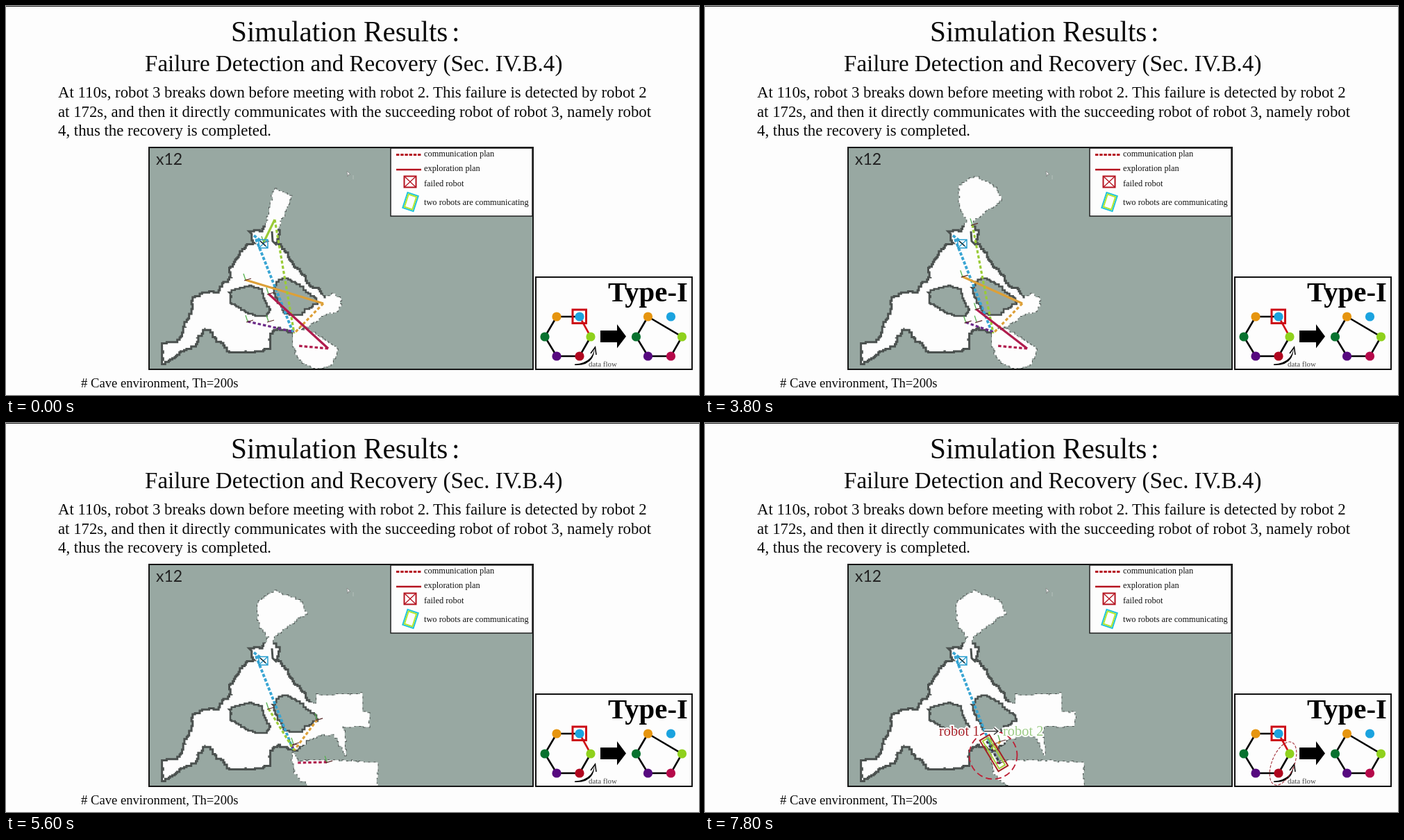
Write an HTML page that moves like this. It is 998 by 561 pixels and loops after 8 s.

```html
<!DOCTYPE html>
<html lang="en">
<head>
<meta charset="utf-8">
<title>Failure Detection and Recovery</title>
<style>
  html, body { margin: 0; width: 100%; height: 100%; overflow: hidden; background: #fdfdfd; }
  svg { display: block; font-family: "Liberation Serif", "Times New Roman", serif; }
  .note { font-size: 20.4px; paint-order: stroke; stroke: #fff; stroke-width: 4px; stroke-linejoin: round; }
  .line { fill: none; }
</style>
</head>
<body>
<svg width="998" height="561" viewBox="0 0 998 561">
  <clipPath id="panel"><rect x="207" y="205" width="551" height="318.5"/></clipPath>
  <rect width="998" height="1" fill="#222"/>

  <g fill="#0a0a0a">
    <g font-size="41.2"><text x="324" y="51">Simulation Results</text><text x="642" y="51">:</text></g>
    <text x="200" y="94" font-size="33.05">Failure Detection and Recovery (Sec. IV.B.4)</text>
    <g font-size="22.8">
      <text x="75" y="132">At 110s, robot 3 breaks down before meeting with robot 2. This failure is detected by robot 2</text>
      <text x="75" y="159.5">at 172s, and then it directly communicates with the succeeding robot of robot 3, namely robot</text>
      <text x="75" y="186.5">4, thus the recovery is completed.</text>
    </g>
    <text x="108" y="550" font-size="18.65"># Cave environment, Th=200s</text>
  </g>

  <rect x="206" y="204" width="553" height="320" fill="#98a8a2"/>
  <g id="map" clip-path="url(#panel)"></g>
  <path d="M491 238l5 5-3 0-1 3z" fill="#eee" stroke="#777" stroke-width=".6"/>
  <path d="M500 244v6" stroke="#b4bfba"/>
  <text x="216" y="229" font-size="23" fill="#222" font-family="Lato, sans-serif">x12</text>
  <rect x="206" y="204" width="553" height="320" fill="none" stroke="#151515" stroke-width="2"/>

  <g font-size="12.36" fill="#111">
    <rect x="554" y="205" width="204" height="98" fill="#fdfdfd" stroke="#222" stroke-width="1.5"/>
    <text x="602" y="217">communication plan</text>
    <text x="602" y="237.5">exploration plan</text>
    <text x="602" y="260">failed robot</text>
    <text x="602" y="287">two robots are communicating</text>
  </g>
  <g class="line" stroke="#b5121f" stroke-width="2.5">
    <path d="M562 214.5h36" stroke-width="3" stroke-dasharray="4.4 1.8"/>
    <path d="M562 236h36"/>
    <rect x="573.5" y="245.5" width="17" height="16" stroke-width="2"/>
    <path d="M574 246l16 15m0-15l-16 15" stroke-width="1.3"/>
  </g>
  <g class="line" transform="translate(582.5 282.5) rotate(18)" stroke-width="2">
    <rect x="-8" y="-11.5" width="16" height="23" stroke="#1cc3dc"/>
    <rect x="-6" y="-9.5" width="12" height="19" stroke="#b4e62e"/>
  </g>

  <rect x="763" y="391" width="225" height="133" fill="#fdfdfd" stroke="#111" stroke-width="2"/>
  <text x="867" y="426" font-size="40.8" font-weight="bold">Type-I</text>
  <g id="rings"></g>
  <path d="M856 468h24v-9l13 17.500-13 17v-8.500h-24z"/>
  <path d="M819 516.500Q844 515 847.500 494Q847 519 819 518z"/>
  <path class="line" d="M842 501l6.500-9 1.500 11" stroke="#000" stroke-width="1.5"/>
  <text x="839" y="520" font-size="10.9" fill="#444">data flow</text>

  <g id="fail">
    <circle class="line" cx="367" cy="339.500" r="20" stroke="#b02a35" stroke-width="1.4" stroke-dasharray="5 3"/>
    <path d="M314 325l26 6" stroke="#b02a35" stroke-width="1.4"/>
    <path d="M346 333l-8-5-1 6z" fill="#b02a35"/>
    <text class="note" x="248" y="323" fill="#35a9d6">robot 3 <tspan fill="#b01c28">fails</tspan></text>
  </g>
  <g id="meet">
    <circle class="line" cx="415" cy="479" r="34.500" stroke="#bd2036" stroke-width="1.8" stroke-dasharray="9 5"/>
    <g class="line" transform="translate(416 476) rotate(-31)">
      <rect x="-8" y="-26" width="16" height="52" stroke="#a32422" stroke-width="2"/>
      <rect x="-5" y="-23" width="10" height="46" stroke="#a9cf3a" stroke-width="2"/>
      <path d="M0-20V18" stroke="#3a3550" stroke-width="3" stroke-dasharray="4 3"/>
    </g>
    <text class="note" x="337" y="451" fill="#a8242c">robot 1</text>
    <path class="line" d="M402 444.500h20m-6-5l6 5-6 5" stroke="#fff" stroke-width="5"/>
    <path class="line" d="M402 444.500h20m-6-5l6 5-6 5" stroke="#333" stroke-width="1.4"/>
    <text class="note" x="429" y="451" fill="#9ccb86">robot 2</text>
    <ellipse class="line" cx="832.500" cy="491" rx="16" ry="33" transform="rotate(22 832.500 491)" stroke="#a3303a" stroke-width="1.1" stroke-dasharray="4 2"/>
  </g>
</svg>
<script>
const LOOP = 8000, STEP = 200, WALL = '#4b514f';
const $ = id => document.getElementById(id);
const points = s => s.split(' ').map(p => p.split(',').map(Number));
const mix = (a, b, k) => a + (b - a) * k;
const ramp = (t, a, b) => Math.min(1, Math.max(0, (t - a) / (b - a)));
const morph = (a, b, k) => a.map((p, i) => [mix(p[0], b[i][0], k), mix(p[1], b[i][1], k)]);

const cave = points('355,326 370,326 372,320 384,320 391,327 388,343 400,355 408,369 415,379 428,392 432,402 447,411 457,421 457,430 440,445 430,460 417,471 405,466 395,463 384,467 378,476 378,494 354,498 336,498 319,496 318,488 305,479 296,466 285,465 281,474 274,480 273,491 260,492 248,501 238,508 227,514 226,488 246,486 256,474 259,458 268,441 271,422 286,415 306,414 312,403 327,391 324,380 331,368 339,354 350,346 361,342 355,336');
const holes = [
  points('323,412 332,407 350,404 366,408 372,425 381,440 375,447 361,447 345,440 325,428'),
  points('386,406 392,395 400,392 412,397 425,405 432,413 446,422 448,430 440,435 430,440 427,445 412,446 402,442 394,428 387,415')
];
// Explored areas that grow: before, after, start and end of growth.
const areas = [
  ['373,338 372,322 375,310 378,298 381,285 384,272 386,264 398,269 411,275 402,300 396,312 391,325 383,338',
   '373,338 372,318 378,307 366,291 362,276 363,257 372,250 385,242 402,249 422,256 433,275 386,309 383,338', 3300, 3900],
  ['440,408 450,415 457,421 470,415 483,423 482,428 481,434 478,441 470,444 466,442 452,451 436,462 418,471 430,446 450,430',
   '432,402 446,405 447,392 513,391 513,416 523,418 523,437 486,438 490,478 474,449 455,450 436,458 418,471 430,446 450,430', 4100, 5500],
  ['415,468 433,466 455,480 478,496 478,499 474,510 468,520 448,523 430,515 418,500 412,485',
   '413,475 420,487 455,486 478,487 535,490 535,507 535,524 440,524 425,515 416,503 412,485', 4100, 5500]
].map(([a, b, from, to]) => ({ a: points(a), b: points(b), from, to }));

// Each robot walks its keys [time, x, y]; until `arrive` it heads for goal, then for meet.
const robots = [
  { color: '#6d2c88', arrive: 0, goal: [348, 455], meet: [415, 470], keys: [[3200, 348, 455], [4200, 394, 457], [5600, 411, 465]] },
  { color: 'none', arrive: 0, goal: [378, 455], meet: [415, 470], keys: [[3200, 378, 455], [4200, 400, 456], [5600, 414, 463]] },
  { color: '#dda038', arrive: 5500, goal: [457, 429], meet: [415, 472], keys: [[3200, 345, 395], [4200, 388, 387], [5500, 451, 424], [6400, 425, 459]] },
  { color: '#9acb37', arrive: 3700, goal: [387, 308], meet: [415, 472], keys: [[3200, 371, 341], [3700, 387, 308], [4200, 377, 345], [5600, 378, 412], [6400, 412, 466]] },
  { color: '#b01c4d', arrive: 5500, goal: [464, 494], meet: [420, 490], keys: [[3200, 378, 415], [4200, 399, 452], [5500, 467, 489], [6400, 424, 490]] }
];

function locate(keys, t) {
  const i = keys.findIndex(k => k[0] > t);
  if (i === 0) return keys[0].slice(1);
  if (i < 0) return keys[keys.length - 1].slice(1);
  const [a, b] = [keys[i - 1], keys[i]], k = ramp(t, a[0], b[0]);
  return [mix(a[1], b[1], k), mix(a[2], b[2], k)];
}

// Closed outline with the small stair steps of an occupancy grid.
function gridPath(poly) {
  const cell = 1.7, snap = v => (Math.round(v / cell) * cell).toFixed(1);
  let d = '', seed = 7;
  const jitter = () => ((seed = seed * 16807 % 2147483647) / 2147483647 - .5) * 2.2;
  poly.forEach((p, i) => {
    const q = poly[(i + 1) % poly.length];
    const n = Math.ceil(Math.hypot(q[0] - p[0], q[1] - p[1]) / 4);
    for (let j = 0; j < n; j++) {
      const x = snap(mix(p[0], q[0], j / n) + jitter()), y = snap(mix(p[1], q[1], j / n) + jitter());
      d += d ? `H${x}V${y}` : `M${x} ${y}`;
    }
  });
  return d + 'Z';
}

const shape = (d, attrs) => `<path d="${d}" ${attrs}/>`;
const segment = (a, b, color, dash) =>
  shape(`M${a}L${b}`, `stroke="${color}" stroke-width="3.2" ${dash ? 'stroke-dasharray="4.5 3"' : ''}`);
const axes = ([x, y]) =>
  shape(`M${x} ${y}l-3-9`, 'stroke="#55b04e" stroke-width="1.3"') +
  shape(`M${x - 2} ${y + 1}l10-3`, 'stroke="#5b2a2a" stroke-width="1.3"');

const cavePath = gridPath(cave), holePaths = holes.map(gridPath);

function drawMap(t) {
  const grown = areas.map(({ a, b, from, to }, i) => {
    let poly = morph(a, b, ramp(t, from, to));
    if (i) poly = poly.map(([x, y]) => [x > 515 ? x + 10 * ramp(t, 5600, 6400) : x, y]);
    return gridPath(poly);
  });
  let out = grown.map(d => shape(d, `fill="none" stroke="${WALL}" stroke-width="2" stroke-dasharray="3 5"`)).join('');
  out += shape(cavePath, `fill="none" stroke="${WALL}" stroke-width="6"`);
  out += [cavePath, ...grown].map(d => shape(d, 'fill="#fdfdfd"')).join('');
  out += holePaths.map(d => shape(d, `fill="#98a8a2" stroke="${WALL}" stroke-width="2.5"`)).join('');
  out += shape('M383 325l1 14 6 6', `fill="none" stroke="${WALL}" stroke-width="3"`);

  out += shape('M357 331L366 338M360 336L413 470', 'stroke="#39a5d3" stroke-width="3.8" stroke-dasharray="4.5 2.5"');
  for (const { color, arrive, goal, meet, keys } of robots) {
    const here = locate(keys, t);
    if (t < arrive) out += segment(here, goal, color) + segment(goal, meet, color, true);
    else out += segment(here, meet, color, true);
    out += axes(here);
  }
  out += shape('M364 337h13v12h-13zl13 12m0-12l-13 12', 'fill="none" stroke="#2a9fcf" stroke-width="1.5"');
  out += shape('M366 339l8 7', 'stroke="#222" stroke-width="1.4"');
  $('map').innerHTML = out;
}

function drawRings() {
  const spots = points('17,0 50,0 66,29 50,57 17,57 0,29');
  const colors = ['#e6950f', '#1ba3df', '#8fd11c', '#b0061f', '#56097f', '#08722f'];
  const ring = (left, order, marks = '') => `<g transform="translate(${left} 448)">`
    + shape('M' + order.map(i => spots[i]).join('L'), 'fill="none" stroke="#000" stroke-width="2.6"') + marks
    + spots.map(([x, y], i) => `<circle cx="${x}" cy="${y}" r="6.600" fill="${i === 3 && left > 900 ? '#b5094a' : colors[i]}"/>`).join('') + '</g>';
  const failed = shape('M50 0L66 29', 'stroke="#cf1018" stroke-width="2.600"')
    + '<rect x="40" y="-10" width="19.500" height="19.500" fill="none" stroke="#cc0c16" stroke-width="3"/>';
  $('rings').innerHTML = ring(776, [2, 3, 4, 5, 0, 1], failed) + ring(907.5, [0, 2, 3, 4, 5, 0]);
}

let shown = -1;
function tick() {
  const t = Math.floor(performance.now() % LOOP / STEP) * STEP;
  if (t !== shown) {
    shown = t;
    drawMap(t);
    $('fail').style.display = t >= 200 && t < 3400 ? '' : 'none';
    $('meet').style.display = t >= 6400 ? '' : 'none';
  }
  requestAnimationFrame(tick);
}
drawRings();
tick();
</script>
</body>
</html>
```
